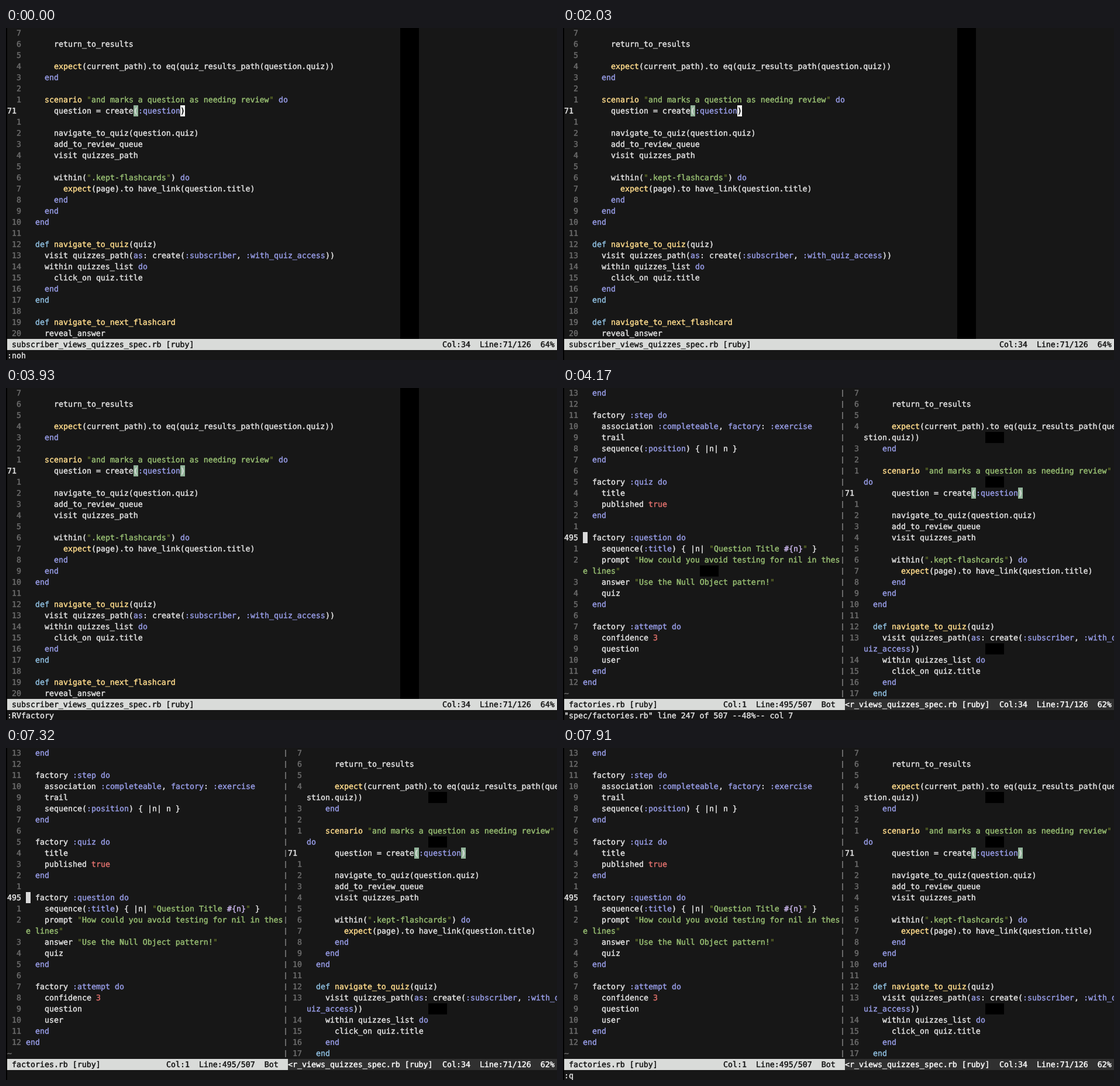
Recreate the animation shown at these times as an HTML page. Size 942 by 567 pixels, loop 8000 ms.

```html
<!DOCTYPE html>
<html lang="en">
<head>
<meta charset="utf-8">
<title>Editor session</title>
<style>
  html, body { margin: 0; width: 100%; height: 100%; overflow: hidden; background: #000; }
  svg { display: block; }
  text {
    font: 13.288px "DejaVu Sans Mono", "Noto Sans Mono", monospace;
    white-space: pre;
    text-rendering: geometricPrecision;
    stroke-width: .45px;
  }
</style>
</head>
<body>
<svg id="stage" width="942" height="567" viewBox="0 0 942 567"></svg>
<script>
const LOOP = 8000, CELL = 8, ROW = 19, LEFT = 2, TOP = -1, STATUS_ROW = 28, COMMAND_ROW = 29;
const C = {
  bg: '#171717', fg: '#e4e4e4', number: '#6c6c6c', string: '#98bf72', quote: '#5c6b28',
  keyword: '#979ce6', def: '#8fbfe0', name: '#ffdc8c', constant: '#e0706c', interp: '#cdb9f0',
  match: '#92b49a', select: '#4b4b4b', cursor: '#f6f6f6', block: '#dadada',
  bar: '#d9dbd9', barIdle: '#303030', split: '#8a8a8a'
};

const specLines = `

      return_to_results

      expect(current_path).to eq(quiz_results_path(question.quiz))
    end

    scenario "and marks a question as needing review" do
      question = create(:question)

      navigate_to_quiz(question.quiz)
      add_to_review_queue
      visit quizzes_path

      within(".kept-flashcards") do
        expect(page).to have_link(question.title)
      end
    end
  end

  def navigate_to_quiz(quiz)
    visit quizzes_path(as: create(:subscriber, :with_quiz_access))
    within quizzes_list do
      click_on quiz.title
    end
  end

  def navigate_to_next_flashcard
    reveal_answer`.split('\n').slice(1);

const factoryLines = `
  end

  factory :step do
    association :completeable, factory: :exercise
    trail
    sequence(:position) { |n| n }
  end

  factory :quiz do
    title
    published true
  end

  factory :question do
    sequence(:title) { |n| "Question Title #{n}" }
    prompt "How could you avoid testing for nil in these lines"
    answer "Use the Null Object pattern!"
    quiz
  end

  factory :attempt do
    confidence 3
    question
    user
  end
end`.split('\n').slice(1);

const px = col => LEFT + col * CELL;
const py = row => TOP + row * ROW;
const escapeXml = s => s.replace(/&/g, '&amp;').replace(/</g, '&lt;');

const cells = (col, row, count, color) =>
  `<rect x="${px(col)}" y="${py(row)}" width="${count * CELL}" height="${ROW}" fill="${color}"/>`;

const label = (col, row, str, color = C.fg) =>
  `<text x="${px(col)}" y="${py(row) + 14}" fill="${color}" stroke="${color}">${escapeXml(str)}</text>`;

const TOKEN = /"[^"]*"|(?<=def )\w+|\b(?:def|do|end|true|expect|scenario)\b|:\w+|\w+(?=: )|\b\d+\b/g;

function tokenColor(token) {
  if (token === 'def') return C.def;
  if (token === 'true' || /^\d/.test(token)) return C.constant;
  if (/^(do|end|as|factory|:.*)$/.test(token)) return C.keyword;
  return C.name;
}

// One colour per character, so that wrapping can cut a token anywhere.
function paint(line) {
  const colors = Array(line.length).fill(C.fg);
  for (const m of line.matchAll(TOKEN)) {
    const token = m[0], end = m.index + token.length;
    if (token[0] !== '"') {
      colors.fill(tokenColor(token), m.index, end);
      continue;
    }
    colors.fill(C.string, m.index, end);
    colors[m.index] = colors[end - 1] = C.quote;
    for (const part of token.matchAll(/#\{\w+\}/g)) {
      colors.fill(C.interp, m.index + part.index, m.index + part.index + part[0].length);
    }
  }
  return colors;
}

function runs(line, colors, col, row) {
  let out = '';
  for (let i = 0, j; i < line.length; i = j) {
    for (j = i + 1; j < line.length && colors[j] === colors[i];) j++;
    const str = line.slice(i, j);
    const lead = str.length - str.trimStart().length;
    if (str.trim()) out += label(col + i + lead, row, str.trim(), colors[i]);
  }
  return out;
}

function pane(lines, col, current, lineNumber, wrap) {
  let out = '', row = 0, defIndent = -1;
  for (const [i, line] of lines.entries()) {
    if (row >= STATUS_ROW) break;
    const here = i === current, number = String(here ? lineNumber : Math.abs(i - current));
    out += label(here ? col : col + 3 - number.length, row, number, here ? C.fg : C.number);
    const colors = paint(line), indent = line.search(/\S/);
    if (/^ *def /.test(line)) defIndent = indent;
    if (line.trim() === 'end' && indent === defIndent) colors.fill(C.def);
    let at = 0;
    do {
      out += runs(line.slice(at, at + wrap), colors.slice(at, at + wrap), col + 4, row++);
      at += wrap;
    } while (at < line.length);
  }
  return out;
}

const fullText = pane(specLines, 0, 7, 71, 200);
const splitText = pane(factoryLines, 0, 13, 495, 55) + pane(specLines, 60, 7, 71, 54) + label(0, 27, '~', C.number);
const splitBars = Array.from({ length: STATUS_ROW }, (_, row) =>
  `<rect x="477.3" y="${py(row) + 4}" width="1.4" height="12" fill="${C.split}"/>`).join('');

function fullView({ selected, typing }) {
  const marks = selected ? cells(21, 7, 16, C.select) : cells(27, 7, 1, C.match);
  return `<rect x="674" y="0" width="32" height="531"/>` + marks +
    cells(37, 7, 1, typing ? C.match : C.cursor) + fullText +
    (typing ? '' : label(37, 7, ')', '#000')) +
    cells(0, STATUS_ROW, 118, C.bar) +
    label(1, STATUS_ROW, 'subscriber_views_quizzes_spec.rb [ruby]', '#111') +
    label(93, STATUS_ROW, 'Col:34  Line:71/126  64%', '#111');
}

function splitView({ selected, typing, fresh }) {
  return (fresh ? cells(29, 16, 4, '#000') : '') +
    [4, 8, 23].map(row => cells(90, row, 4, '#000')).join('') +
    (selected ? cells(4, 13, 23, C.select) : '') +
    (typing ? '' : cells(4, 13, 1, C.block)) +
    cells(87, 9, 1, C.match) + cells(97, 9, 1, C.match) + splitText + splitBars +
    cells(0, STATUS_ROW, 60, C.bar) + cells(60, STATUS_ROW, 58, C.barIdle) +
    label(1, STATUS_ROW, 'factories.rb [ruby]', '#111') +
    label(34, STATUS_ROW, 'Col:1  Line:495/507  Bot', '#111') +
    label(60, STATUS_ROW, '<r_views_quizzes_spec.rb [ruby]', '#fff') +
    label(93, STATUS_ROW, 'Col:34  Line:71/126  62%', '#fff');
}

const step = (at, view, command, flags = {}) => ({ at, view, command, ...flags });
const prompt = { typing: true, caret: true };
const timeline = [
  step(0, fullView, ':noh'),
  step(500, fullView, '-- VISUAL --'),
  step(950, fullView, '-- VISUAL --', { selected: true }),
  step(2030, fullView, ''),
  step(2510, fullView, ':', prompt),
  step(2800, fullView, ':R', prompt),
  step(3040, fullView, ':RV', prompt),
  step(3340, fullView, ':RVf', prompt),
  step(3460, fullView, ':RVfa', prompt),
  step(3690, fullView, ':RVfactory', prompt),
  step(3930, fullView, ':RVfactory', { typing: true }),
  step(4170, splitView, '"spec/factories.rb" line 247 of 507 --48%-- col 7', { fresh: true }),
  step(5610, splitView, '-- VISUAL LINE --', { selected: true }),
  step(7320, splitView, ''),
  step(7620, splitView, ':', prompt),
  step(7790, splitView, ':q', prompt),
  step(7910, splitView, ':q', { typing: true })
];

const stage = document.getElementById('stage');
let shown = null;

function render(time) {
  const state = timeline.findLast(s => s.at <= time);
  if (state === shown) return;
  shown = state;
  stage.innerHTML = `<rect x="${LEFT}" width="940" height="567" fill="${C.bg}"/>` +
    state.view(state) + label(0, COMMAND_ROW, state.command) +
    (state.caret ? cells(state.command.length, COMMAND_ROW, 1, C.block) : '');
}

const start = performance.now();
function tick() {
  render((performance.now() - start) % LOOP);
  requestAnimationFrame(tick);
}
tick();
</script>
</body>
</html>
```
